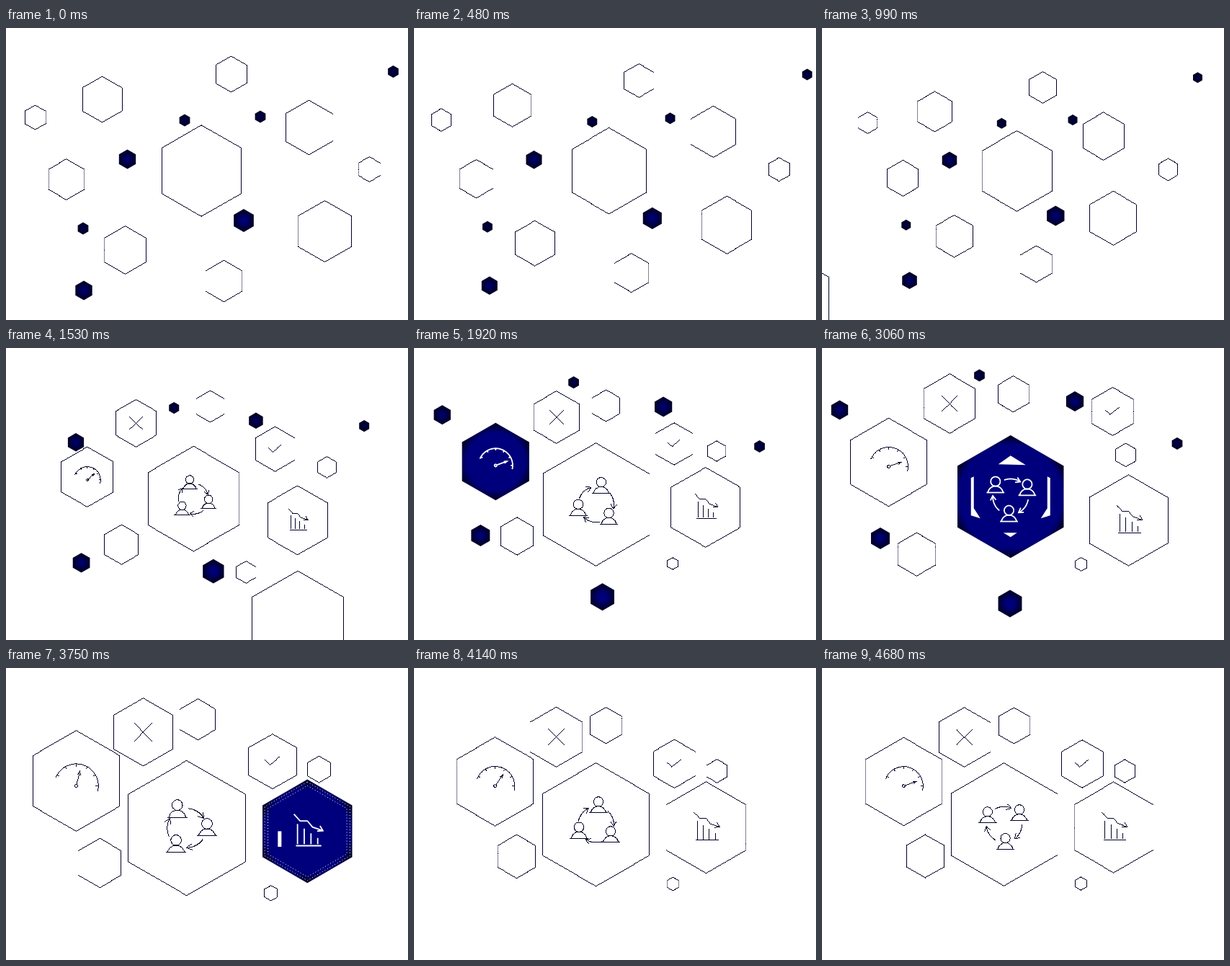
Recreate the animation shown at these times as an HTML page with a canvas. Size 558 px wide and 405 px high, loop 4.71 s.

```html
<!DOCTYPE html>
<html lang="en">
<head>
<meta charset="utf-8">
<title>Hexagon network</title>
<style>
  html, body { margin: 0; width: 100%; height: 100%; overflow: hidden; background: #fff; }
  canvas { display: block; }
</style>
</head>
<body>
<canvas id="stage" width="558" height="405"></canvas>
<script>
const ctx = document.getElementById('stage').getContext('2d');
const LOOP = 4710, STEP = 30, INK = '#000028', RAD = Math.PI / 180;
const ICONS_FROM = 1500, DOTS_UNTIL = 3450, STRAYS_UNTIL = 1470;
const MID = { x: 270, y: 199 }, FOCUS = { x: 271, y: 167 };

const clamp = v => Math.max(0, Math.min(1, v));
const lerp = (a, b, u) => a + (b - a) * u;
const linear = u => u;
const smooth = u => u * u * (3 - 2 * u);
const cubicOut = u => 1 - (1 - u) ** 3;

// Camera shots; each eases towards the next one.
const SHOTS = [
  { at: 0, ease: linear },
  { at: 990, ease: linear },
  { at: 1920, spread: 0, zoom: 1, grow: 0.88, ease: cubicOut },
  { at: 2490, spread: 1, zoom: 1, grow: 1, ease: linear },
  { at: 3060, spread: 0.9, zoom: 1, grow: 1, ease: u => smooth(clamp((u - 0.3) / 0.7)) },
  { at: 3750, spread: 0, zoom: 1.1, grow: 1.14, ease: u => cubicOut(clamp((u - 0.065) / 0.54)) },
  { at: 4680, spread: 0, zoom: 1, grow: 1 },
];
const TURNS = [46, 117, 215, 362, 446];

function cameraAt(t) {
  let i = 0;
  while (i < SHOTS.length - 2 && t >= SHOTS[i + 1].at) i++;
  const a = SHOTS[Math.max(i, 2)], b = SHOTS[Math.max(i + 1, 2)];
  const u = clamp((t - SHOTS[i].at) / (SHOTS[i + 1].at - SHOTS[i].at));
  const e = SHOTS[i].ease(u), mix = key => lerp(a[key], b[key], e);
  return { t, i, u, e, s: i + u, spread: mix('spread'), zoom: mix('zoom'), grow: mix('grow') };
}

/* ---- motion ---- */

// First scene: wider hexagons fall inwards faster; all swing out a little at first.
function opening({ x, y, r }, u) {
  const k = 1 - u * (0.02 + 0.0047 * r);
  const kx = k + 0.24 * Math.max(0, u * (1 - u));
  return { x: MID.x + kx * (x - MID.x), y: MID.y + k * (y - MID.y), r: r * (1 - 0.12 * u) };
}

function settled(o, cam) {
  const { x, y, r } = o.home;
  if (o.dot) {
    const k = (1 + Math.min(1, cam.grow)) / 2;
    return { x: lerp(MID.x, x, k), y: lerp(MID.y, y, k), r };
  }
  const [dx, dy] = o.drift;
  return {
    x: FOCUS.x + cam.zoom * (x + dx * cam.spread - FOCUS.x),
    y: FOCUS.y + cam.zoom * (y + dy * cam.spread - FOCUS.y),
    r: r * (o.hub ? cam.zoom : cam.grow),
  };
}

function poseOf(o, cam) {
  if (!o.home) return opening(o.start, cam.t / SHOTS[1].at);
  if (cam.i === 0) return opening(o.start, cam.u);
  const b = settled(o, cam);
  if (cam.i > 1) return b;
  const a = opening(o.start, 1);
  return { x: lerp(a.x, b.x, cam.e), y: lerp(a.y, b.y, cam.e), r: lerp(a.r, b.r, cam.e) };
}

/* ---- drawing ---- */

function pixelLine(x0, y0, x1, y1, gap = 1) {
  const n = Math.max(1, Math.ceil(Math.max(Math.abs(x1 - x0), Math.abs(y1 - y0))));
  for (let k = 0; k <= n; k += gap) {
    ctx.fillRect(Math.floor(lerp(x0, x1, k / n)), Math.floor(lerp(y0, y1, k / n)), 1, 1);
  }
}

function hexPath(x, y, r) {
  ctx.beginPath();
  for (let k = 0; k < 6; k++) {
    const a = (60 * k - 90) * RAD;
    ctx.lineTo(x + r * Math.cos(a), y + r * Math.sin(a));
  }
  ctx.closePath();
}

// Upright edges thin out when they fall between two pixel columns.
function uprightEdge(x, y0, y1) {
  const f = x - Math.floor(x);
  if (f >= 0.42 && f < 0.6) return;
  pixelLine(x, y0, x, y1, f >= 0.25 && f < 0.42 ? 2 : 1);
}

function outline({ x, y, r }) {
  const w = r * Math.sqrt(3) / 2, h = r / 2;
  const left = x - w + 1e-6, right = x + w + 1e-6;
  ctx.fillStyle = INK;
  for (const side of [left, right]) {
    pixelLine(side, y - h, x, y - r);
    pixelLine(side, y + h, x, y + r);
    uprightEdge(side, y - h, y + h);
  }
}

// Blue that darkens over the outer few pixels.
function solid({ x, y, r }) {
  const rim = 14, core = `rgb(0 0 ${24 + 100 * Math.min(1, r / rim)})`;
  const g = ctx.createRadialGradient(x, y, Math.max(0, r - rim), x, y, r);
  g.addColorStop(0, core);
  g.addColorStop(1, '#000018');
  ctx.fillStyle = g;
  hexPath(x, y, r);
  ctx.fill();
}

// Pen working in units of the hexagon's radius.
function makePen({ x, y, r }, lit) {
  const line = (...pts) => {
    const q = pts.map(([a, b]) => [x + a * r, y + b * r]);
    if (lit) {
      ctx.strokeStyle = '#fff';
      ctx.lineWidth = 1.8;
      ctx.beginPath();
      q.forEach(v => ctx.lineTo(...v));
      ctx.stroke();
    } else {
      ctx.fillStyle = INK;
      for (let k = 1; k < q.length; k++) pixelLine(...q[k - 1], ...q[k]);
    }
  };
  const arc = (cx, cy, rad, from, to) => {
    const n = 18;
    line(...Array.from({ length: n + 1 }, (_, k) => {
      const a = lerp(from, to, k / n) * RAD;
      return [cx + rad * Math.cos(a), cy + rad * Math.sin(a)];
    }));
  };
  const head = (px, py, deg, size, angle = 32) => {
    const barb = d => [px - size * Math.cos((deg + d) * RAD), py - size * Math.sin((deg + d) * RAD)];
    line(barb(-angle), [px, py], barb(angle));
  };
  return { line, arc, head };
}

/* ---- icons ---- */

function people(pen, cam) {
  const k = Math.max(0, cam.i - 2);
  const turn = lerp(TURNS[k], TURNS[k + 1], cam.s - 2 - k);
  for (let deg = turn; deg < turn + 359; deg += 120) {
    const x = 0.3 * Math.cos(deg * RAD), y = 0.3 * Math.sin(deg * RAD) - 0.075;
    pen.arc(x, y, 0.078, 0, 360);
    pen.arc(x, y + 0.2, 0.125, -170, -10);
    pen.line([x - 0.145, y + 0.18], [x + 0.145, y + 0.18]);

    const end = deg + 88;
    pen.arc(0, 0, 0.29, deg + 34, end);
    pen.head(0.29 * Math.cos(end * RAD), 0.29 * Math.sin(end * RAD), end + 82, 0.085);
  }
}

function gauge(pen, cam) {
  const cy = 0.1, needle = -48 + 28 * Math.cos(Math.PI * cam.s);
  const at = (r, d) => [r * Math.cos(d * RAD), cy + r * Math.sin(d * RAD)];
  pen.arc(0, cy, 0.44, -157, 13);
  for (let d = -150; d <= 0; d += 30) pen.line(at(0.44, d), at(0.39, d));
  pen.arc(0, cy, 0.03, 0, 360);
  pen.line(at(0.04, needle), at(0.31, needle));
  pen.head(...at(0.31, needle), needle, 0.08, 18);
}

function chart(pen) {
  pen.line([-0.26, -0.33], [-0.14, -0.2], [0, -0.2], [0.1, -0.08], [0.3, -0.01]);
  pen.head(0.3, -0.01, 28, 0.11);
  pen.line([-0.22, 0.28], [0.27, 0.28]);
  for (let k = 0; k < 4; k++) {
    const x = -0.19 + 0.13 * k;
    pen.line([x, -0.14 + 0.09 * k], [x, 0.25]);
  }
}

function cross(pen) {
  pen.line([-0.26, -0.26], [0.26, 0.26]);
  pen.line([0.26, -0.26], [-0.26, 0.26]);
}

function check(pen) {
  pen.line([-0.28, -0.05], [-0.1, 0.13], [0.26, -0.17]);
}

/* ---- highlights inside lit hexagons ---- */

function patch(...pts) {
  ctx.fillStyle = '#fff';
  ctx.beginPath();
  pts.forEach(p => ctx.lineTo(...p));
  ctx.fill();
}

function peopleGlow({ x, y }) {
  patch([x - 17, y - 45], [x, y - 57], [x + 21, y - 44]);
  patch([x - 10, y + 50], [x + 9, y + 50], [x, y + 56]);
  for (const s of [-1, 1]) {
    patch([x + 51 * s, y - 28], [x + 55 * s, y - 26], [x + 55 * s, y + 26],
      [x + 42 * s, y + 30], [x + 51 * s, y + 16]);
  }
}

function chartGlow({ x, y, r }) {
  ctx.strokeStyle = '#fff';
  ctx.lineWidth = 1;
  ctx.setLineDash([1, 3]);
  for (const k of [0.95, 0.88]) {
    hexPath(x, y, r * k);
    ctx.stroke();
  }
  ctx.setLineDash([]);
  ctx.fillStyle = '#fff';
  ctx.fillRect(x - 0.57 * r, y, 0.07 * r, 0.3 * r);
}

/* ---- cast ---- */

// Hexagons are given by left edge, right edge and centre height.
const box = (l, r, y) => ({ x: (l + r) / 2, y, r: (r - l) / Math.sqrt(3) });
const disc = (x, y, r) => ({ x, y, r });
const hex = (start, home, drift, opts) => ({ start, home, drift, ...opts });
const dot = (start, home) => ({ start, home, dot: true, until: home ? DOTS_UNTIL : STRAYS_UNTIL });

const cast = [
  hex(box(291, 334, 64), box(245, 288.3, 80), [-1, -18]),
  hex(box(489.3, 519.5, 196), box(406, 434, 143), [2, 6]),
  hex(box(136.3, 194, 308), box(117, 169, 261), [-13, 28]),
  hex(box(277.5, 327.3, 351), box(351, 367, 299), [1, 1]),
  hex(box(26, 55.3, 124), null, null, { until: STRAYS_UNTIL }),
  hex(box(106, 161, 99), box(162, 233.5, 96), [-23, -21], { icon: cross }),
  hex(box(388, 453.5, 138), box(332, 390, 133), [47, -50], { icon: check }),
  hex(box(59.3, 108.3, 210), box(60.3, 166.3, 157.5), [-23, 1], { icon: gauge, lit: [1680, 2220] }),
  hex(box(216, 326, 198), box(179, 326.5, 217), [10, -12],
    { icon: people, lit: [2700, 3270], glow: peopleGlow, hub: true }),
  hex(box(405.3, 479, 282), box(350.3, 459.5, 221), [23, 20],
    { icon: chart, lit: [3480, 4050], glow: chartGlow }),
  dot(disc(248, 128, 8.5), disc(218.5, 38, 8.5)),
  dot(disc(353, 123, 8.5), disc(351, 74, 14)),
  dot(disc(537.5, 60.5, 8.5), disc(493, 132.5, 8.5)),
  dot(disc(168.5, 182, 13.5), disc(24.5, 86, 13.5)),
  dot(disc(108, 364, 13.5), disc(81, 264, 15)),
  dot(disc(330, 267, 16), disc(261, 354.5, 19)),
  dot(disc(107, 278, 8.5)),
];

/* ---- frame ---- */

function draw(o, cam) {
  if (o.until && cam.t > o.until) return;
  const pose = poseOf(o, cam);
  const lit = o.lit && cam.t >= o.lit[0] && cam.t < o.lit[1];
  if (o.dot || lit) solid(pose);
  else outline(pose);
  if (lit && o.glow) o.glow(pose);
  if (o.icon && cam.t >= ICONS_FROM) o.icon(makePen(pose, lit), cam);
}

// A near hexagon drifting past along the bottom edge.
function drawPasser(t) {
  if (t > 960 && t < 1800) outline(disc(-54 + 0.85 * (t - 990), 382, 73));
}

function render(time) {
  const t = Math.floor(time % LOOP / STEP) * STEP;
  const cam = cameraAt(t);
  ctx.fillStyle = '#fff';
  ctx.fillRect(0, 0, 558, 405);
  drawPasser(t);
  cast.forEach(o => draw(o, cam));
}

const start = performance.now();
function tick() {
  render(performance.now() - start);
  requestAnimationFrame(tick);
}
tick();
</script>
</body>
</html>
```
